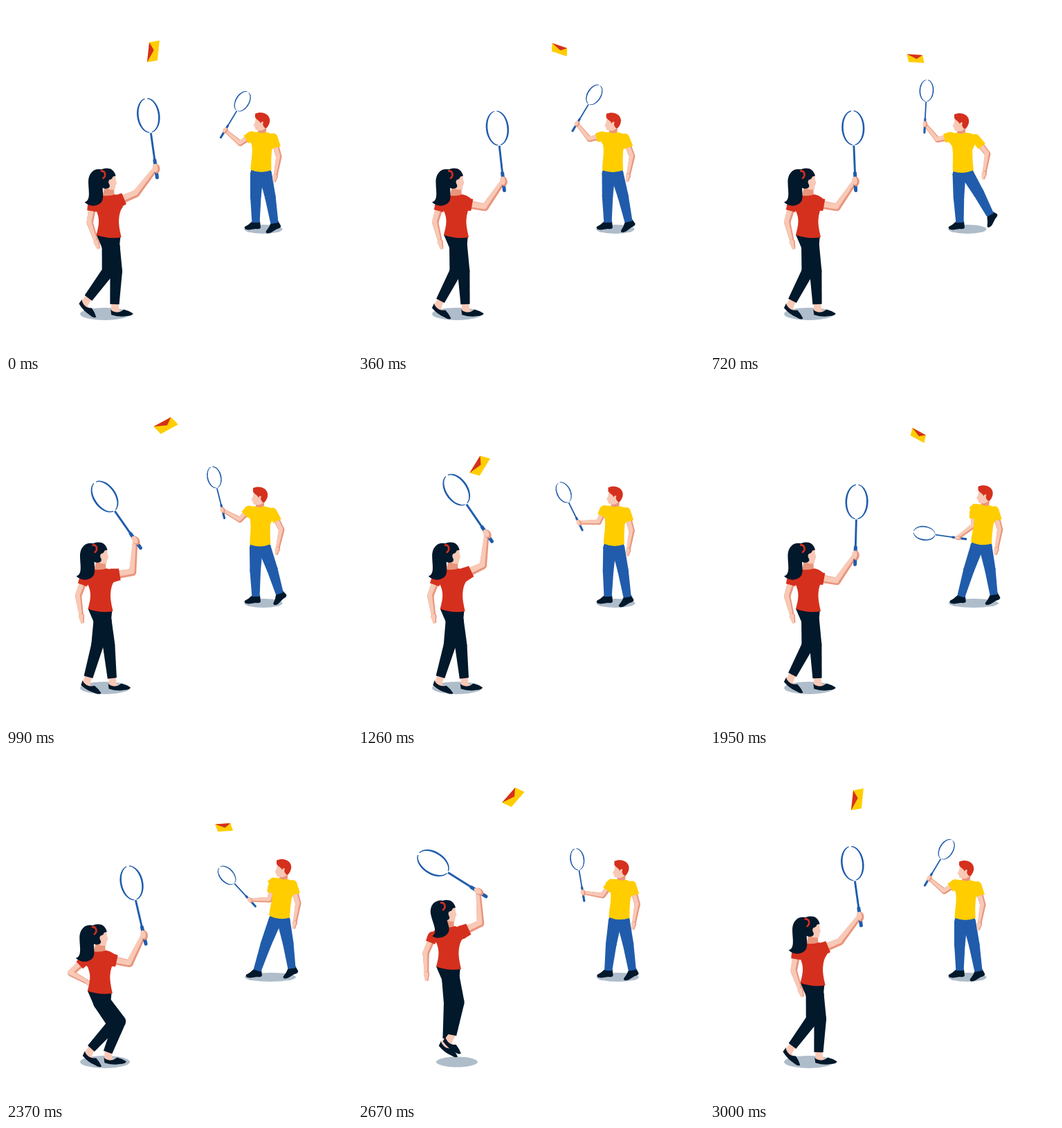
An HTML page with a canvas that plays this animation: 500 px wide and 500 px high, repeating every 3030 ms.

```html
<!DOCTYPE html>
<html lang="en">
<head>
<meta charset="utf-8">
<title>Letter badminton</title>
<style>
  html, body { margin: 0; width: 100%; height: 100%; overflow: hidden; background: #fff; }
  canvas { display: block; width: 100vw; height: 100vh; }
</style>
</head>
<body>
<canvas id="stage"></canvas>
<script>
const canvas = document.getElementById('stage');
const ctx = canvas.getContext('2d');
const dpr = window.devicePixelRatio || 1;
canvas.width = canvas.height = 500 * dpr;

const NAVY = '#02182b', RED = '#d5301e', YELLOW = '#ffcd00', BLUE = '#205cab';
const SKIN = '#f8c9b6', SHADE = '#e9957d', SHADOW = '#afbdcb';
const LOOP = 3030, CYCLE = 3000, STEP = 30;

// The four hits of the rally; curve and height shape the flight that follows.
const hits = [
  { by: 'man', time: 640, x: 318, y: 92, curve: 1.2, height: 54 },
  { by: 'girl', time: 1320, x: 168, y: 146, curve: 1.23, height: 96 },
  { by: 'man', time: 2220, x: 340, y: 167, curve: .6, height: 54 },
  { by: 'girl', time: 2830, x: 163, y: 82, curve: 1.65, height: 28 }
];
const [overhand, , underhand, jumpHit] = hits;
const girlHits = hits.filter(h => h.by === 'girl');

const art = {
  girlShirt: 'M-9 -1 L-18 2 L-26 10 L-17 22 C-13 32 -13 40 -18 56 Q0 63 18 60 Q14 42 15 34 Q16 22 21 16 L21 3 Q16 -1 10 -2 Q1 1 -9 -1Z',
  girlFace: 'M1 -5 L12 -7 L13 2 L14.5 8 L13 10 L12 16 Q8 18 2 16 Z',
  girlHair: 'M13 -3 C11 -11 6 -14 0 -14 C-9 -14 -14 -8 -13 2 C-12 12 -5 17 1 15 C5 14 5 11 3 8 C2 5 3 2 6 2 Q8 1 9 -2Z',
  tail: 'M-6 -12 C-17 -15 -25 -9 -26.5 3 C-27 18 -22 32 -32 35 C-25 42 -13 42 -7 34 C-3 27 -8 14 -5 2Z',
  band: 'M-9 -10 C-2 -11 0 -3 -6 1',
  girlFoot: 'M-5 -1 L5 -2 L7 9 L15 13 L8 16 L-5 14Z',
  girlShoe: 'M-6 8 L-5 16 Q8 20 18 18 Q27 18 28 14 Q22 10 14 8 Q8 13 2 12 Q-4 11 -6 8Z',
  manShirt: 'M-5 -1 L-16 -1 L-22 5 L-14 18 C-12 32 -15 42 -15 55 Q0 61 15 55 Q14 40 15 26 L22 12 Q20 2 14 1 L6 -1 Q0 2 -5 -1Z',
  manFace: 'M-9 -7 L-10 1 L-12.5 6 L-10.5 8 L-9.5 12 Q-5 14 0 13 L7 9 L8 -4Z',
  manHair: 'M-10 -11 C-4 -14 4 -13 8 -9 C12 -5 13 2 7 9 Q4 11 3 8 Q0 5 2 1 Q-1 -1 -2 3 C-3 -1 -8 -2 -10 -6Z',
  manShoe: 'M6 -2 L7 7 Q6 10 0 9 L-10 10.5 Q-18 10 -16 6 Q-10 3 -5 -2Z'
};
for (const name in art) art[name] = new Path2D(art[name]);

// Timing helpers
const ramp = (x, a, b) => {
  const u = Math.min(1, Math.max(0, (x - a) / (b - a)));
  return u * u * (3 - 2 * u);
};
const since = (t, moment) => ((t - moment) % CYCLE + CYCLE * 1.5) % CYCLE - CYCLE / 2;
const pulse = (x, up0, up1, down0, down1) => ramp(x, up0, up1) * (1 - ramp(x, down0, down1));
const bump = (x, half) => Math.abs(x) < half ? Math.cos(x / half * Math.PI / 2) ** 2 : 0;

// Geometry helpers
const add = (p, x, y) => [p[0] + x, p[1] + y];
const mix = (a, b, u) => [a[0] + (b[0] - a[0]) * u, a[1] + (b[1] - a[1]) * u];
const dist = (a, b) => Math.hypot(b[0] - a[0], b[1] - a[1]);

// Middle joint of two bones; side picks the bend.
function bend(a, b, la, lb, side) {
  const full = dist(a, b), d = Math.min(full, la + lb - .1);
  const dx = (b[0] - a[0]) / full, dy = (b[1] - a[1]) / full;
  const k = (d * d + la * la - lb * lb) / (2 * d);
  const h = side * Math.sqrt(Math.max(0, la * la - k * k));
  return add(a, dx * k - dy * h, dy * k + dx * h);
}

function place([x, y], angle, draw, sx = 1, sy = sx) {
  ctx.save();
  ctx.translate(x, y);
  ctx.rotate(angle);
  ctx.scale(sx, sy);
  draw();
  ctx.restore();
}

function fill(color, path) {
  ctx.fillStyle = color;
  path ? ctx.fill(path) : ctx.fill();
}

function oval(color, x, y, rx, ry = rx, angle = 0) {
  ctx.beginPath();
  ctx.ellipse(x, y, rx, ry, angle, 0, 7);
  fill(color);
}

function poly(color, pts) {
  ctx.beginPath();
  pts.forEach(p => ctx.lineTo(p[0], p[1]));
  ctx.closePath();
  fill(color);
}

function bone(color, a, ra, b, rb) {
  const d = dist(a, b) || 1, nx = (a[1] - b[1]) / d, ny = (b[0] - a[0]) / d;
  poly(color, [add(a, nx * ra, ny * ra), add(b, nx * rb, ny * rb),
    add(b, -nx * rb, -ny * rb), add(a, -nx * ra, -ny * ra)]);
  oval(color, a[0], a[1], ra);
}

function limb(color, pts, radii) {
  bone(color, pts[0], radii[0], pts[1], radii[1]);
  bone(color, pts[1], radii[1], pts[2], radii[2]);
}

function arm(pts, size) {
  const radii = [6, 5.2, 3.4].map(r => r * size);
  limb(SHADE, pts, radii);
  limb(SKIN, pts.map(p => add(p, -1.3 * size, -1.2 * size)), radii.map(r => r * .72));
}

function hangingHand(elbow, hand, size) {
  const tip = mix(hand, elbow, -10 * size / dist(hand, elbow));
  bone(SHADE, hand, 4 * size, tip, 2 * size);
  bone(SKIN, add(hand, -1, 0), 3.4 * size, add(tip, -1, 0), 1.6 * size);
}

function sleeve(color, shoulder, elbow, length, r0, r1) {
  bone(color, shoulder, r0, mix(shoulder, elbow, length / dist(shoulder, elbow)), r1);
}

function torso(neck, hip, length, color, path) {
  const angle = Math.atan2(hip[1] - neck[1], hip[0] - neck[0]) - Math.PI / 2;
  place(neck, angle, () => fill(color, path), 1, dist(neck, hip) / length);
}

function racket(hand, angle, size, butt) {
  const line = (y0, y1, w, cap) => {
    ctx.lineWidth = w;
    ctx.lineCap = cap;
    ctx.beginPath();
    ctx.moveTo(0, y0);
    ctx.lineTo(0, y1);
    ctx.stroke();
  };
  place(hand, angle, () => {
    ctx.strokeStyle = BLUE;
    line(-52, -12, 2.9, 'butt');
    line(-12, butt, 5, 'round');
    // Two crescents that thin out towards the gaps
    for (const start of [-Math.PI / 2, Math.PI / 2]) {
      const from = start + .12, to = start + Math.PI - .12;
      ctx.beginPath();
      ctx.ellipse(0, -77.5, 16.6, 25.4, 0, from, to);
      ctx.ellipse(0, -77.5, 14, 24.2, 0, to, from, true);
      fill(BLUE);
    }
  }, size);
  oval(SHADE, hand[0] + size, hand[1], 4.8 * size, 7 * size, angle);
  oval(SKIN, hand[0] - size, hand[1] - size, 3.8 * size, 6 * size, angle);
}

function drawGirl(t) {
  const swing = (...times) => girlHits.reduce((sum, h) => sum + pulse(since(t, h.time), ...times), 0);
  const cock = swing(-560, -200, -110, 40);
  const raise = swing(-520, -220, 40, 340);
  const crouch = bump(since(t, jumpHit.time - 460), 260);
  const lift = bump(since(t, jumpHit.time - 160), 180);

  const sway = 11 * (raise * (1 - cock) - cock) - 5 * crouch;
  const neck = [141 + sway, 274.5 + 11.5 * crouch - 23.5 * lift];
  const hip = add(neck, 1, 59), head = add(neck, -2, -26);

  const shoulder = add(neck, 12 + 7 * cock, 11 - 4 * raise);
  const hand = add(neck, 69 - 25 * cock, -21 - 31 * raise);
  const elbow = bend(shoulder, hand, 31, 46, 1);
  const tilt = (-2 - 6 * Math.cos(t / CYCLE * 2 * Math.PI) - 51 * cock) * Math.PI / 180;

  const backShoulder = add(neck, -22, 13);
  const backHand = add(backShoulder, .8 * sway + 12 * crouch, 54 - 22 * crouch);
  const backElbow = bend(backShoulder, backHand, 26, 30, 1);

  const ankle = [155 + .3 * sway - 6 * crouch - 16 * lift, 431 - 25 * lift];
  const backAnkle = [119 + 4 * crouch + 10 * lift, 426 - .6 * sway - 4 * crouch - 21 * lift];
  const leg = (dx, foot, toe) => {
    const top = add(hip, dx, 14);
    place(foot, toe, () => {
      fill(SKIN, art.girlFoot);
      fill(NAVY, art.girlShoe);
    }, .95);
    limb(NAVY, [top, bend(top, foot, 36, 48, -1), foot], [11, 8.8, 6.6]);
  };

  oval(SHADOW, 143, 445, 36 - 6 * lift, 9 - 1.5 * lift);
  leg(1, backAnkle, .04 * (440 - backAnkle[1] - 14 * lift));
  leg(5, ankle, .65 * lift);
  poly(NAVY, [add(hip, -18, -3), add(hip, 17, -3), add(hip, 15, 18), add(hip, -9, 18)]);

  arm([backShoulder, backElbow, backHand], .9);
  hangingHand(backElbow, backHand, 1);
  bone(SHADE, add(head, 4, 12), 6.5, add(neck, 0, 3), 9);
  torso(neck, hip, 59, RED, art.girlShirt);
  sleeve(RED, backShoulder, backElbow, 9, 7.5, 7);

  place(head, 0, () => {
    fill(SKIN, art.girlFace);
    fill(NAVY, art.girlHair);
    place([-13, -10], -.24 * lift, () => {
      ctx.translate(13, 10);
      fill(NAVY, art.tail);
    });
    ctx.strokeStyle = RED;
    ctx.lineWidth = 2.6;
    ctx.lineCap = 'butt';
    ctx.stroke(art.band);
  });

  arm([shoulder, elbow, hand], 1);
  sleeve(RED, shoulder, elbow, 12, 10, 8.5);
  racket(hand, tilt, 1, 13);
}

function drawMan(t) {
  const toHigh = since(t, overhand.time), toLow = since(t, underhand.time);
  const high = pulse(toHigh, -960, -450, 100, 560);
  const cock = pulse(toHigh, -1050, -640, -60, 180);
  const low = pulse(toLow, -1150, -450, -60, 320);
  const back = pulse(toLow, -1100, -50, 150, 640);
  const lunge = bump(toHigh - 80, 500);

  const neck = [369.5 + 31 * back - 7 * lunge, 183 - 2 * back + lunge];
  const hip = add(neck, -1 - 4.5 * back + 4.5 * lunge, 55);
  const head = add(neck, .5, -16.3);

  const shoulder = add(neck, -15, 5 + 6 * back);
  const hand = add(neck, -55 + 3 * high + 16 * low, 18 - 31 * high + 29 * low);
  const elbow = bend(shoulder, hand, 19, 29, -1);
  const tilt = (-14 + 45 * cock - 68 * low) * Math.PI / 180;

  const backShoulder = add(neck, 17 - 3 * back + 4 * lunge, 7);
  const backHand = add(backShoulder, 3 + 10 * lunge, 56 - 5 * lunge);
  const backElbow = bend(backShoulder, backHand, 29, 28.5, -1);

  const leg = (dx, foot, toe) => {
    const top = add(hip, dx, 4);
    place(foot, toe, () => fill(NAVY, art.manShoe));
    limb(BLUE, [top, add(mix(top, foot, .47), dx / 6, 0), foot], [9.5, 7.8, 5.6]);
  };

  oval(SHADOW, 372 + 10 * back, 322.5, 27.5 + 9.5 * back, 6.5);
  leg(6, [388 + 25 * back + 17 * lunge, 314 - 4 * back - 12 * lunge], -.4 - .55 * lunge);
  leg(-6, [361 + 2 * back, 313], 0);

  arm([backShoulder, backElbow, backHand], .8);
  hangingHand(backElbow, backHand, .85);
  arm([shoulder, elbow, hand], .75);
  bone(SHADE, add(head, 1, 8), 5.5, add(neck, 0, 2), 6);
  sleeve(YELLOW, backShoulder, backElbow, 15, 6, 6.5);
  sleeve(YELLOW, shoulder, elbow, 9, 7, 6.5);
  torso(neck, hip, 56, YELLOW, art.manShirt);
  place(head, 0, () => {
    fill(SKIN, art.manFace);
    fill(RED, art.manHair);
  });
  racket(hand, tilt, .63, 19);
}

function drawLetter(t) {
  const i = (hits.findIndex(h => h.time > t) + 3) % 4;
  const from = hits[i], to = hits[(i + 1) % 4];
  const lasts = (to.time - from.time + CYCLE) % CYCLE;
  const u = ((t - from.time + CYCLE) % CYCLE) / lasts;
  const x = to.x + (from.x - to.x) * (from.curve < 1 ? 1 - u ** 1.4 : (1 - u) ** from.curve);
  const y = from.y + (to.y - from.y) * u - from.height * 4 * u * (1 - u);

  const spin = ramp(u, 0, 1);
  const deg = from.by === 'girl' ? -103 + 168 * spin : 6 - 66 * spin;
  const length = 29 - 7 * ramp(x, 215, 315);
  const along = deg * Math.PI / 180, down = (deg + 74) * Math.PI / 180;
  const at = (a, b) => [
    x + length * (a * Math.cos(along) + .52 * b * Math.cos(down)),
    y + length * (a * Math.sin(along) + .52 * b * Math.sin(down))];
  poly(YELLOW, [at(-.5, -.5), at(.5, -.5), at(.5, .5), at(-.5, .5)]);
  poly(RED, [at(-.5, -.5), at(.5, -.5), at(.06, .04)]);
}

const begin = performance.now();
function frame() {
  const ms = (performance.now() - begin) % LOOP;
  const t = Math.floor(ms / STEP) * STEP % CYCLE;
  ctx.setTransform(dpr, 0, 0, dpr, 0, 0);
  ctx.fillStyle = '#fff';
  ctx.fillRect(0, 0, 500, 500);
  drawMan(t);
  drawGirl(t);
  drawLetter(t);
  requestAnimationFrame(frame);
}
frame();
</script>
</body>
</html>
```
